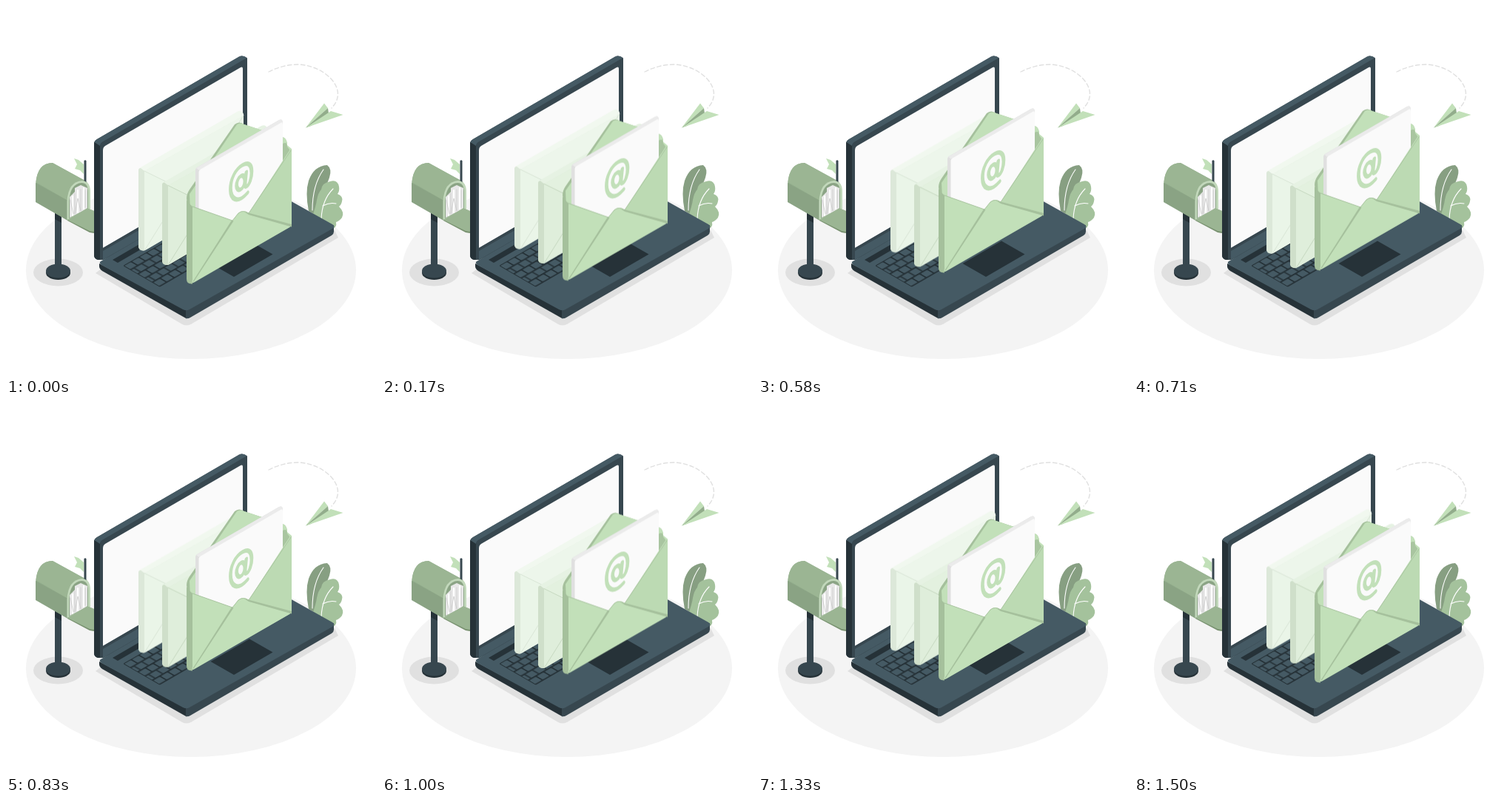
An HTML page for the animation above (1540 ms loop, 500x500 px).

```html
<!DOCTYPE html>
<html lang="en">
<head>
<meta charset="utf-8">
<title>Incoming mail</title>
<style>
  html, body { margin: 0; width: 100%; height: 100%; overflow: hidden; background: #fff; }
  svg { display: block; width: 100%; height: 100%; }
  .float { animation: 770ms linear infinite alternate; }
  .near { animation-name: rise; animation-delay: -65ms; }
  .far { animation-name: drift; animation-delay: -570ms; }
  @keyframes rise { from { transform: translateY(1.7px); } to { transform: translateY(-18.3px); } }
  @keyframes drift { from { transform: translateY(7.4px); } to { transform: translateY(-2.6px); } }
  .pale { --top: #f1f8ef; --side: #dce8d9; --front: #eaf5e8; --flap: #edf6eb; --line: #dae6d7; }
  .mid { --top: #e6f2e3; --side: #cfdfca; --front: #dfeedb; --flap: #e3f1df; --line: #c7d9c1; }
  .line { fill: none; stroke-linecap: round; stroke-linejoin: round; }
</style>
</head>
<body>
<svg viewBox="0 0 500 500">
  <defs>
    <pattern id="keys" width="12" height="22.6" patternUnits="userSpaceOnUse">
      <rect x="1" y="1.2" width="10" height="9" rx="1.2" fill="#455a64"/>
      <path d="M0 12.5H4.5V21.5H0ZM6.5 12.5H12V21.5H6.5Z" fill="#455a64"/>
    </pattern>
    <g id="sealed">
      <path fill="var(--top)" d="M179 224Q179 220 182 218L313 142.500Q319 140 321 146V250Q321 252 318 254L190 329Q184 333 179 326Z"/>
      <path fill="var(--front)" d="M187 223L321 148V250Q321 252 318 254L187 330.500Z"/>
      <path fill="var(--flap)" d="M187 223L246 252Q254 255 258 246L321 148Z"/>
      <path fill="var(--side)" d="M179 222Q179 219 182 219L187 223V330.500Q179 331 179 325Z"/>
      <path class="line" stroke="var(--line)" d="M187 223L246 252Q254 255 258 246L321 148M188 329L238 249"/>
    </g>
  </defs>

  <ellipse cx="250" cy="357" rx="223" ry="120" fill="#f4f4f4"/>

  <!-- plants -->
  <path fill="#879f82" d="M409 277Q404 252 409 236Q416 216 434 215Q441 220 437 232Q434 242 426 249Q420 258 421 284Z"/>
  <path fill="#a4c29c" d="M414 284Q419 270 420 262Q422 252 426 248Q427 239 438 237Q448 234 450 244Q451 250 448 254Q456 257 454 264Q453 269 450 271Q458 279 454 286Q450 291 446 292Q448 300 438 302Z"/>
  <g class="line" stroke="#fff" stroke-width="1.100">
    <path d="M414 276Q414 242 429 221M426 288Q427 262 442 247M428 270Q437 265 446 267"/>
  </g>

  <!-- paper plane -->
  <path class="line" stroke="#e0e0e0" stroke-width="1.400" stroke-dasharray="5.500 3.500" d="M355 89Q374 79 396 79Q422 81 439 98Q455 116 444 133L440 138"/>
  <path fill="#c2e0b9" d="M405 164.500L430 131.500L435 138Z"/>
  <path fill="#92ad8b" d="M405 164.500L435 138L436 145L412 162Z"/>
  <path fill="#c2e0b9" d="M405 164.500L439 142L455.500 147Z"/>

  <!-- mailbox -->
  <ellipse cx="70.500" cy="360" rx="33.500" ry="18.500" fill="#e0e0e0"/>
  <ellipse cx="70.500" cy="360.500" rx="16.500" ry="9.500" fill="#263238"/>
  <ellipse cx="70.500" cy="358" rx="16.500" ry="9.500" fill="#37474f"/>
  <path fill="#37474f" d="M66 275H75V357Q70.500 361 66 357Z"/>
  <path fill="#263238" d="M66 279L75 284V293L66 288Z"/>
  <path fill="#c2e0b9" d="M92 206L98 208L105 214V227L100 222L93 220L96 214Z"/>
  <path fill="#92ad8c" d="M40 264V241Q42 212 63 212L107 236Q113 240 113 250V276L84 290Z"/>
  <path fill="#9bb593" d="M40.500 238Q43 212 63 212L106 236Q85 240 83.500 263Z"/>
  <path fill="#8aa384" d="M40 239L83.500 263V290L40 265Z"/>
  <path fill="#c2d8bb" d="M82.500 289V264Q84 237 103 236Q114 237 114 251V274Z"/>
  <path fill="#8ba485" d="M85 287V264Q87 240 102 239Q111 239 111 252V274Z"/>
  <path fill="#e8e8e8" d="M86 286V258L93 251V246L101 242L110 246V274Z"/>
  <path class="line" stroke="#fff" stroke-width="2" d="M90 257V283M97 249V279M105 246V274"/>
  <path class="line" stroke="#c9c9c9" stroke-width=".8" d="M93 253V281L97 260L101 277V248M87 262L91 281M107 249V272"/>
  <path fill="#37474f" d="M105.500 209.500Q107 207 108.500 209.500V238L105.500 236Z"/>
  <path fill="#78916f" d="M83 290L111 274L132 284Q142 292 139 299Q130 310 113 306Z"/>
  <path fill="#9bb593" d="M83 289L110 273L131 282Q142 289 139 296Q130 308 113 304Z"/>

  <!-- laptop -->
  <path fill="#e0e0e0" d="M121 361L130 354L444 303L449 313L250 430Q244 433 238 430Z"/>
  <path fill="#37474f" d="M119 186Q119 182 123 180L315 68.500Q320 66 326 70.500V250L131 343H125Q119 342 119 337Z"/>
  <path fill="#263238" d="M119 184L128 188V343H124Q119 341 119 337Z"/>
  <path fill="#455a64" d="M119.500 184Q120 182 123 180L315 68.500Q320 66 325.500 70L130 184Q127 186 127 189Z"/>
  <path fill="#37474f" d="M127 190Q127 186 130 184L326 70.500V250L131 343H127Z"/>
  <path fill="#fafafa" d="M131 195Q131 191 134 189L317 83Q320 81.500 320 85V217L131 327Z"/>
  <path fill="#263238" d="M126 348L244 411V422.500L130 358Q126 355 126 352Z"/>
  <path fill="#37474f" d="M443 296V305Q443 308 440 310L249 421Q246 423 243 422V410Z"/>
  <path fill="#455a64" d="M128 345L320 234Q326 231 332 234L441 295Q446 298 441 301L248 410Q244 412.500 239 410L129 350Q125 347 128 345Z"/>
  <path fill="#37474f" d="M131 327L320 217V234L131 343Z"/>
  <path fill="#455a64" d="M131 331L320 222V234L131 343Z"/>
  <path fill="#263238" d="M144 343L230 293L237 297L151 347Z"/>
  <g transform="matrix(.866 -.5 .866 .5 158 351)">
    <rect width="126" height="57.500" rx="2" fill="#263238"/>
    <rect x="1" y=".5" width="124" height="56.500" fill="url(#keys)"/>
  </g>
  <path fill="#263238" d="M276.500 348L329 317.500L360.500 335.500L308 366Z"/>

  <!-- envelopes -->
  <g class="float far">
    <use href="#sealed" class="pale"/>
    <use href="#sealed" class="mid" x="32" y="19.500"/>
  </g>
  <g class="float near">
    <path fill="#a5c09c" d="M244 260Q244 254 248 248L309 160Q315 155 322 160L376 178Q380 181 380 188V230L250 300Z"/>
    <path fill="#c2e0b9" d="M248 254L312 160Q316 157 322 160L376 178Q380 181 380 188L386 193V230L250 300Z"/>
    <path fill="#a9c5a0" d="M380 190Q380 183 374 186V214L386 198Z"/>
    <path fill="#e0e0e0" d="M256 222Q256 219 259 217.500L369 154Q374 152 374 158V260L256 290Z"/>
    <path fill="#ebebeb" d="M257 219L369 154Q374 152 374 158L261 222Z"/>
    <path fill="#fafafa" d="M260.500 224Q260.500 222 263 220.500L371 158Q374 156 374 160V265L300 300L260.500 290Z"/>
    <g class="line" stroke="#c2e0b9" stroke-width="5.400" transform="matrix(.866 -.5 0 1 317.700 237.500)">
      <path d="M10 20C-6 28-16.500 15-16.500 1C-16.500-12-9-21.500 2-21.500C12-21.500 16.500-14 16.500-5C16.500 5 12 10.500 9 10.500C6 10.500 6 7 6.500 4L8-9"/>
      <ellipse cx="-.5" cy="1" rx="6.500" ry="9"/>
    </g>
    <path fill="#a5c09c" d="M244 262Q247 267 252 271V375.500Q244 376 244 369Z"/>
    <path fill="#c2e0b9" d="M252 271L306 290L314 280Q320 274 328 280L383 195Q386 191 386 196V294Q386 297 383 299L255 373Q250 376 252 370Z"/>
    <path fill="#bcdab3" d="M328 280L386 193V296Z"/>
    <path fill="#c2e0b9" d="M252 374L306 290L314 280Q320 275 328 280L386 297L383 299Z"/>
    <path fill="#a5c09c" d="M252 373L305 289.500L307.500 290.500L254 372ZM322 278L386 295V298.500L328 282Z"/>
    <path class="line" stroke="#a9c5a0" d="M252 271L306 290L314 280Q320 275 328 280L385 195"/>
  </g>
</svg>
</body>
</html>
```
